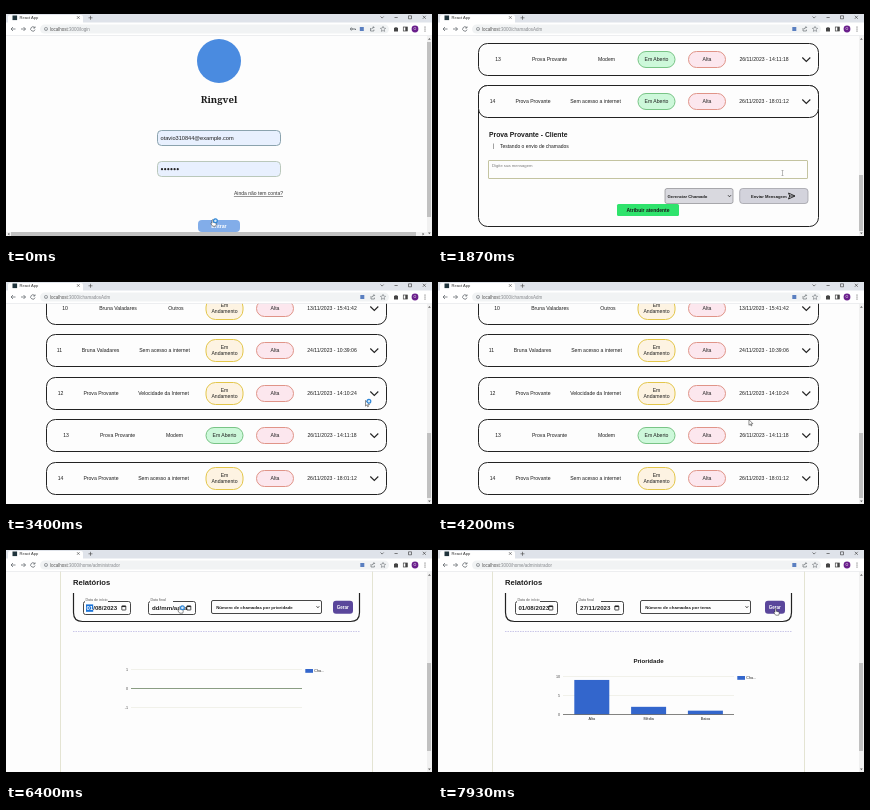
These frames come from a looping animation (426x240 px, 8000 ms). An HTML page:

```html
<!DOCTYPE html>
<html lang="pt">
<head>
<meta charset="utf-8">
<title>Chamados</title>
<style>
html, body { margin: 0; width: 100%; height: 100%; overflow: hidden; background: #000; }
svg { display: block; width: 100%; height: 100%; font-family: "Liberation Sans", Arial, sans-serif; }
</style>
</head>
<body>
<svg id="stage" viewBox="0 0 426 240"></svg>
<script>
const LOOP = 8000, STEP = 200 / 3, BOTTOM = 230;
const stage = document.getElementById('stage');

// Drawing helpers
const rect = (x, y, w, h, fill, r = 0, stroke = 'none', sw = 1) =>
  `<rect x="${x}" y="${y}" width="${w}" height="${h}" rx="${r}" fill="${fill}" stroke="${stroke}" stroke-width="${sw}"/>`;
const path = (d, stroke = '#444', sw = 1, fill = 'none', extra = '') =>
  `<path d="${d}" fill="${fill}" stroke="${stroke}" stroke-width="${sw}" ${extra}/>`;
const circle = (x, y, r, fill, stroke = 'none', sw = 1) =>
  `<circle cx="${x}" cy="${y}" r="${r}" fill="${fill}" stroke="${stroke}" stroke-width="${sw}"/>`;
const text = (s, x, y, size, { fill = '#1c1c1c', anchor = 'start', bold = false, extra = '' } = {}) =>
  `<text x="${x}" y="${y}" font-size="${size}" fill="${fill}" text-anchor="${anchor}" font-weight="${bold ? 700 : 400}" ${extra}>${s}</text>`;
const mid = (s, x, y, size = 5.1, opts = {}) => text(s, x, y, size, { anchor: 'middle', ...opts });
const group = (x, y, body) => `<g transform="translate(${x} ${y})">${body}</g>`;
const snap = v => Math.round(v - 0.5) + 0.5;

// Eased values along [time, ...values] keys
function track(t, keys) {
  if (t <= keys[0][0]) return keys[0].slice(1);
  for (let i = 1; i < keys.length; i++) {
    const a = keys[i - 1], b = keys[i];
    if (t <= b[0]) {
      const p = (t - a[0]) / (b[0] - a[0]), e = p * p * (3 - 2 * p);
      return a.slice(1).map((v, k) => v + (b[k + 1] - v) * e);
    }
  }
  return keys[keys.length - 1].slice(1);
}

function browser(url, login) {
  const nav = '#555b60', shift = login ? -0.5 : 0;
  return rect(0, 8, 426, 9, '#dfe3ea') +
    path('M2 17V11Q2 9 4 9H75Q77 9 77 11V17Z', 'none', 0, '#fff') +
    rect(6.5, 9.5, 4.6, 4.6, '#20343c') +
    text('React App', 13.5, 13.3, 4.1, { fill: '#333' }) +
    path('M71 10.2l2.6 2.6m0-2.6l-2.6 2.6M84.5 9.8v4m-2-2h4', '#444', 0.6) +
    path('M374.5 10.5l1.6 1.6 1.6-1.6M388.5 11.5h3.2M402.5 9.8h3v3h-3zM416.8 9.8l3 3m0-3l-3 3', '#333', 0.6) +
    rect(0, 16.5, 426, 13, '#fff') +
    rect(34, 18.6, 349, 9, '#f1f3f4', 4.5) +
    path('M9.5 23H5m2-2l-2 2 2 2M15 23h4.5m-2-2l2 2-2 2', nav, 0.7) +
    path('M28.6 21.6a2.2 2.2 0 1 0 .4 2M29 20.4v1.6h-1.7', nav, 0.7) +
    circle(40, 23, 1.6, 'none', nav, 0.5) + path('M40 22.8v1', nav, 0.5) +
    `<text x="44" y="24.7" font-size="4.5" fill="#555">localhost<tspan fill="#85888c">${url}</tspan></text>` +
    (login ? circle(345.4, 23, 1, 'none', nav, 0.8) + path('M346.5 23h3v1', nav, 0.8) : '') +
    rect(354.3 + shift, 21, 4, 4, '#5a7fc0') +
    path(`M${365 + shift} 22v3h3.4v-1.4M${366 + shift} 23.3q.4-2 2.6-2m-1-1l1 1-1 1`, nav, 0.6) +
    path('M377 20.4l.8 1.7 1.8.2-1.3 1.3.3 1.8-1.6-.9-1.6.9.3-1.8-1.3-1.3 1.8-.2z', nav, 0.5) +
    path('M388 21.8h1.2a.8.8 0 0 1 1.6 0h1.2v3.6h-4z', 'none', 0, '#444') +
    rect(397.3, 21, 4, 4, 'none', 0, '#444', 0.7) + rect(399.3, 21, 2, 4, '#444') +
    circle(409, 23, 3.4, '#6a1f8c') + mid('O', 409, 24.3, 3.6, { fill: '#fff' }) +
    [21, 23, 25].map(y => circle(419, y, 0.55, '#444')).join('') +
    path('M0 29.5H426', '#dadce0', 0.5);
}

function scrollbar(top, bottom, across) {
  return rect(421, 30, 5, BOTTOM - 30, '#f1f1f1') +
    path('M422 33.8l1.4-1.8 1.4 1.8zM422 226.5l1.4 1.8 1.4-1.8z', 'none', 0, '#666') +
    rect(421, top, 4, bottom - top, '#c1c1c1') +
    (across ? rect(0, 226, 421, BOTTOM - 226, '#f1f1f1') + rect(5, 226, 405, 4, '#c1c1c1') +
      path('M3.4 226.8l-1.8 1.3 1.8 1.3zM416.5 226.8l1.8 1.3-1.8 1.3z', 'none', 0, '#666') : '');
}

function loginPage(t) {
  return circle(213, 55, 22, '#4a8be0') +
    mid('Ringvel', 213, 97, 9.6, { bold: true, extra: 'font-family="Noto Serif, serif"' }) +
    rect(151.5, 124.5, 123, 15, '#e8f0fe', 4, '#7f9aa5', 0.9) +
    text('otavio310844@example.com', 154.5, 134, 5.65) +
    rect(151.5, 155.5, 123, 15, '#e8f0fe', 4, '#b4c3b4', 0.9) +
    [0, 1, 2, 3, 4, 5].map(i => circle(156 + i * 3.15, 163.2, 1.1, '#222')).join('') +
    text('Ainda não tem conta?', 277, 189.3, 5.05, { anchor: 'end', fill: '#333', extra: 'text-decoration="underline"' }) +
    rect(192, 214, 42, 12, t < 330 ? '#82ade9' : '#4a8be0', 4) +
    mid('Entrar', 213, 222, 5.2, { fill: '#fff', bold: true });
}

const BRUNA = 'Bruna Valadares', PROVA = 'Prova Provante', NET = 'Sem acesso a internet';
// id, id x, name, name x, subject, subject x, deadline
const ROWS = [
  [8, 52.5, BRUNA, 94, NET, 158, '04/11/2023 - 23:05:06'],
  [10, 59, BRUNA, 112, 'Outros', 170, '13/11/2023 - 15:41:42'],
  [11, 53.5, BRUNA, 94.5, NET, 158.5, '24/11/2023 - 10:39:06'],
  [12, 54.5, PROVA, 95, 'Velocidade da Internet', 157.5, '26/11/2023 - 14:10:24'],
  [13, 60, PROVA, 111.5, 'Modem', 168.5, '26/11/2023 - 14:11:18'],
  [14, 54.5, PROVA, 95, NET, 157.5, '26/11/2023 - 18:01:12']
];
const HEADS = [['ID:', 55], ['Nome do Cliente', 90.5], ['Tema da chamada', 144.5],
  ['Status da chamada', 201.5], ['Prioridade da chamada', 263.5], ['Prazo de resposta', 324.5]];

const card = (y, h, r = 9) => rect(40.5, y, 340, h, '#fdfdfd', r, '#222', 1);

function pill(x, y, w, h, fill, stroke, lines) {
  return rect(x - w / 2, y - h / 2, w, h, fill, Math.min(h / 2, 9.5), stroke, 1) +
    lines.map((s, i) => mid(s, x, y + 1.8 + (i - (lines.length - 1) / 2) * 5.7)).join('');
}

function ticket(row, y, open) {
  const [id, ix, name, nx, subject, sx, date] = row;
  return card(y - 16, 32) +
    mid(id, ix, y + 1.8) + mid(name, nx, y + 1.8) + mid(subject, sx, y + 1.8) +
    (open ? pill(218.5, y, 37, 16, '#cdf8da', '#79c486', ['Em Aberto'])
          : pill(218.5, y, 37, 22, '#fdf3e2', '#e3c64a', ['Em', 'Andamento'])) +
    pill(269, y, 37, 16, '#fce7ee', '#e09488', ['Alta']) +
    mid(date, 326, y + 1.8) + path(`M364.3 ${y - 2}l4 4 4-4`, '#222', 1.1);
}

function details(y) {
  return card(y - 16, 141) + group(0, y - 95.5,
    text(PROVA + ' - Cliente', 51, 131.3, 6.8, { bold: true }) +
    path('M55.5 137.5v5.5', '#666', 0.6) +
    text('Testando o envio de chamados', 62, 142, 4.98) +
    rect(50.5, 154.5, 319, 18, '#fdfdfd', 0.5, '#b5b58a', 0.8) +
    text('Digite sua mensagem', 54, 161, 4.2, { fill: '#777' }) +
    rect(227, 182.5, 68, 15, '#d9d9df', 2, '#8a8a8f', 0.7) +
    text('Gerenciar Chamado', 229.6, 191.7, 4.2, { bold: true }) +
    path('M290 189.2l1.5 1.6 1.5-1.6', '#222', 0.8) +
    rect(301.7, 182.5, 68.3, 15, '#d3d3dc', 3, '#99999f', 0.7) +
    text('Enviar Mensagem', 313, 191.7, 4.2, { bold: true }) +
    path('M350.5 187l6.5 3-6.5 3 1.2-3zM351.7 190h5', '#222', 0.9) +
    rect(179, 198, 62, 12, '#2fe36c', 1.5) +
    mid('Atribuir atendente', 210, 206, 5, { bold: true }));
}

const LIST_SCROLL = [[600, 0], [930, 94.4], [1330, 94.4], [1600, 203], [2669, 203],
  [2670, 0], [2870, 0], [3200, 94.4], [4270, 94.4], [4730, 0]];

function listPage(t) {
  const [scroll] = track(t, LIST_SCROLL);
  const expanded = t >= 1330 && t < 2670, assigned = t >= 2670;
  const head = snap(50.6 - scroll);
  let out = card(head - 9, 18, 7) +
    HEADS.map(([s, x]) => mid(s, x, head + 1.8)).join('') +
    path(`M361 ${head - 2}h7m-5.7 2h4.4m-3.2 2h2`, '#222', 0.9);
  ROWS.forEach((row, i) => {
    const y = snap(86.6 + i * 42.4 - scroll);
    if (i === 5 && expanded) out += details(y);
    out += ticket(row, y, i === 4 || i === 5 && !assigned);
  });
  return out;
}

function dateField(x, w, label, value, picked, tx) {
  const ix = x + w - 8.7;
  return rect(x, 59.5, w, 13, '#fdfdfd', 2, '#333', 0.9) +
    rect(x + 1.5, 56, 23, 4, '#fdfdfd') + text(label, x + 2, 58.6, 3.6, { fill: '#555' }) +
    (picked ? rect(tx - 0.4, 62.4, 7.2, 7.4, '#1a73d8') : '') +
    `<text x="${tx}" y="68.3" font-size="6.15" font-weight="700" fill="#222">` +
    `<tspan fill="${picked ? '#fff' : '#222'}">${value.slice(0, 2)}</tspan>${value.slice(2)}</text>` +
    rect(ix, 64, 4, 4, 'none', 0.3, '#222', 0.8) + path(`M${ix} 64.4h4`, '#222', 1.3);
}

function chart(ready) {
  const zero = ready ? 172.5 : 146.5, gap = 19.2, top = zero - gap * (ready ? 2 : 1);
  const ticks = ready ? [10, 5, 0] : [1, 0, -1];
  let out = ticks.map((n, i) => {
    const y = snap(top + i * gap);
    return path(`M125 ${y}H296`, '#e9e9de', 0.6) + text(n, 122, y + 1.3, 3.7, { anchor: 'end', fill: '#444' });
  }).join('');
  if (ready) {
    out += mid('Prioridade', 210.5, 120.5, 6.1, { bold: true });
    [['Alta', 9], ['Média', 2], ['Baixa', 1]].forEach(([name, n], i) => {
      const h = n * gap / 5, x = 136.3 + i * 56.8;
      out += rect(x, zero - h, 35, h, '#3366cc') + mid(name, x + 17.5, 178.3, 3.8, { fill: '#222' });
    });
  }
  const ly = ready ? 134 : 127;
  return out + path(`M125 ${zero}H296`, ready ? '#555' : '#5f7a58', 0.7) +
    rect(299.3, ly, 7.7, 3.8, '#3366cc') + text('Cha...', 308.3, ly + 3.2, 3.7, { fill: '#222' });
}

function reportPage(t) {
  const filled = t >= 6730, ready = t >= 7130, start = t >= 5930;
  const sx = filled ? 202.5 : 205.5;
  const kind = 'Número de chamadas por ' + (t >= 7600 ? 'tema' : 'prioridade');
  return path('M54.5 29V232M366.5 29V232', '#dedec8', 0.8) +
    text('Relatórios', 67, 43, 7.6, { bold: true }) +
    path('M67.5 51V70.5Q67.5 79.5 76.5 79.5H344.5Q353.5 79.5 353.5 70.5V51', '#222', 1.2) +
    dateField(77.5, filled ? 42 : 47, 'Data de início', start ? '01/08/2023' : 'dd/mm/aaaa', start && !filled, 80.4) +
    dateField(filled ? 138.5 : 142.5, 47, 'Data final', filled ? '27/11/2023' : 'dd/mm/aaaa', false, filled ? 142 : 146) +
    rect(sx, 58.5, 110, 13, '#fdfdfd', 1.5, '#333', 0.9) +
    text(kind, sx + 4.7, 66.7, 4.4, { bold: true }) +
    path(`M${sx + 105} 64.2l1.4 1.6 1.4-1.6`, '#222', 0.8) +
    rect(327, 58.7, 20, 13, '#5a469b', 3) +
    mid('Gerar', 336.8, 66.8, 4.5, { bold: true, fill: '#fff' }) +
    path('M67 89.5H354', '#c4c1e6', 0.9, 'none', 'stroke-dasharray="1.5 1"') +
    chart(ready);
}

const POINTER = [[0, 206, 214], [330, 206, 214], [600, 330, 170], [1000, 369, 205], [1330, 369, 205],
  [1730, 345, 167], [2000, 345, 167], [2470, 212, 204], [2670, 212, 204], [3270, 359.5, 126.5],
  [3670, 359.5, 126.5], [4400, 300, 150], [4800, 285, 155.5], [5130, 285, 155.5], [5600, 81, 65],
  [5930, 82, 66], [6270, 173, 65], [6730, 173, 65], [7000, 337, 67], [7200, 337, 67],
  [7450, 290, 65], [7600, 290, 65], [7800, 337, 67]];

function pointer(t) {
  const [x, y] = track(t, POINTER);
  const within = (a, b) => t >= a && t < b;
  const busy = within(0, 400) || within(1000, 1330) || within(3270, 3670) || within(6270, 6730);
  const hand = within(0, 400) || within(930, 1400) || within(2400, 2700) || within(6270, 6730) ||
    within(6930, 7270) || t >= 7730;
  let body;
  if (within(1670, 2130)) body = path('M-1.5-2.5h2m-1 0v5m-1 0h2', '#777', 0.5);
  else if (hand) body = path('M0 0Q.7-.6 1.3 0V2.3L3.7 2.9Q4.5 3.2 4.2 4.6L3.7 6.2H.7L-1.2 3.6Q-.7 2.8 0 3.3Z', '#222', 0.5, '#fff');
  else body = path('M0 0V5.6L1.3 4.4 2.2 6.3 3 5.9 2.2 4.1H4Z', '#222', 0.5, '#fff');
  if (busy) body += circle(3.4, 0.8, 1.9, '#d6ebfb', '#2f86d6', 1.2);
  return group(x.toFixed(2), y.toFixed(2), body);
}

function render(t) {
  const login = t < 400, report = t >= 5330;
  const url = ':3000/' + (login ? 'login' : report ? 'home/administrador' : 'chamadosAdm');
  const page = login ? loginPage(t) : report ? reportPage(t) : listPage(t);
  const [scroll] = track(t, LIST_SCROLL);
  const thumb = login ? [36, 211] : report ? [121, 209]
    : track(scroll, [[0, 49, 168], [94.4, 159, 224], [203, 169, 225]]);
  stage.innerHTML = `<clipPath id="view"><rect y="29" width="421" height="${BOTTOM - 29}"/></clipPath>` +
    rect(0, 0, 426, 240, '#000') + rect(0, 8, 426, BOTTOM - 8, '#fdfdfd') +
    `<g clip-path="url(#view)">${page}</g>` +
    browser(url, login) + scrollbar(thumb[0], thumb[1], login) + pointer(t);
}

let last = -1;
function tick() {
  const n = Math.floor((performance.now() % LOOP) / STEP + 0.01);
  if (n !== last) render((last = n) * STEP);
  requestAnimationFrame(tick);
}
tick();
</script>
</body>
</html>
```
